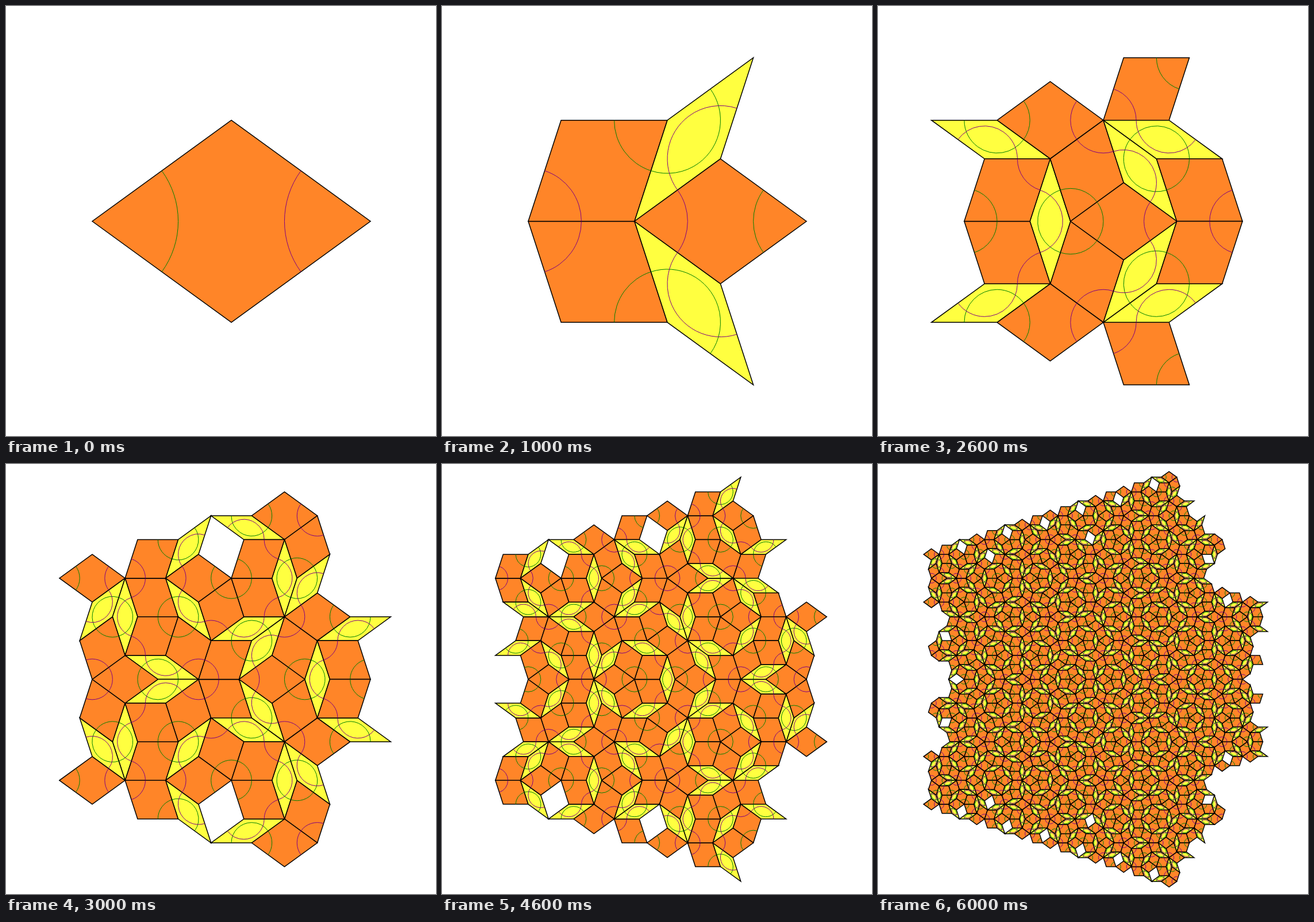
An HTML page with a canvas that plays this animation: 748 px wide and 748 px high, repeating every 7000 ms.

```html
<!DOCTYPE html>
<html>
<head>
<meta charset="utf-8">
<title>Rhombus tiling</title>
<style>
html, body { margin: 0; height: 100%; overflow: hidden; background: #fff; }
canvas { display: block; }
</style>
</head>
<body>
<canvas width="748" height="748"></canvas>
<script>
const ctx = document.querySelector('canvas').getContext('2d');
const SIZE = 748, LEVELS = 7, STEP = 1000;
const RATIO = (3 - Math.sqrt(5)) / 2; // 1 / golden ratio squared

const lerp = (a, b, t) => ({ x: a.x + (b.x - a.x) * t, y: a.y + (b.y - a.y) * t });

// A tile is given by its green and purple corners, which face each other.
function makeTile(thin, green, purple) {
  const half = (thin ? 2 : 1) * Math.PI / 5;
  const dx = purple.x - green.x, dy = purple.y - green.y;
  const mid = lerp(green, purple, 0.5), k = Math.tan(half) / 2;
  const sides = [1, -1].map(s => ({ x: mid.x - s * dy * k, y: mid.y + s * dx * k }));
  const radius = Math.hypot(dx, dy) / Math.cos(half) / 4;
  return { thin, green, purple, sides, half, radius, angle: Math.atan2(dy, dx) };
}

function subdivide({ thin, green, purple, sides }) {
  const parts = sides.flatMap(side => [
    makeTile(false, side, green),
    thin ? makeTile(true, purple, lerp(purple, side, RATIO))
         : makeTile(true, side, lerp(side, purple, RATIO))
  ]);
  if (!thin) parts.push(makeTile(false, purple, lerp(green, purple, RATIO)));
  return parts;
}

// Neighbouring tiles produce shared children, so keep one of each.
function unique(tiles) {
  const key = t => [t.thin, ...[t.green.x, t.green.y, t.purple.x, t.purple.y].map(Math.round)].join();
  return [...new Map(tiles.map(t => [key(t), t])).values()];
}

const levels = [[makeTile(false, { x: 150, y: 374.5 }, { x: 634, y: 374.5 })]];
while (levels.length < LEVELS) levels.push(unique(levels.at(-1).flatMap(subdivide)));

function drawArc(corner, tile, angle, color) {
  ctx.beginPath();
  ctx.arc(corner.x, corner.y, tile.radius, angle - tile.half, angle + tile.half);
  ctx.strokeStyle = color;
  ctx.lineWidth = 1;
  ctx.stroke();
}

function drawTile(tile) {
  const { green, purple, sides, angle } = tile;
  ctx.beginPath();
  for (const p of [green, sides[0], purple, sides[1]]) ctx.lineTo(p.x, p.y);
  ctx.closePath();
  ctx.fillStyle = tile.thin ? '#ffff40' : '#ff8528';
  ctx.fill();
  ctx.strokeStyle = '#000';
  ctx.lineWidth = 1.5;
  ctx.stroke();
  drawArc(green, tile, angle, 'green');
  drawArc(purple, tile, angle + Math.PI, 'purple');
}

let shown = -1;
function frame() {
  const level = Math.floor(performance.now() / STEP) % LEVELS;
  if (level !== shown) {
    shown = level;
    ctx.fillStyle = '#fff';
    ctx.fillRect(0, 0, SIZE, SIZE);
    levels[level].forEach(drawTile);
  }
  requestAnimationFrame(frame);
}
frame();
</script>
</body>
</html>
```
